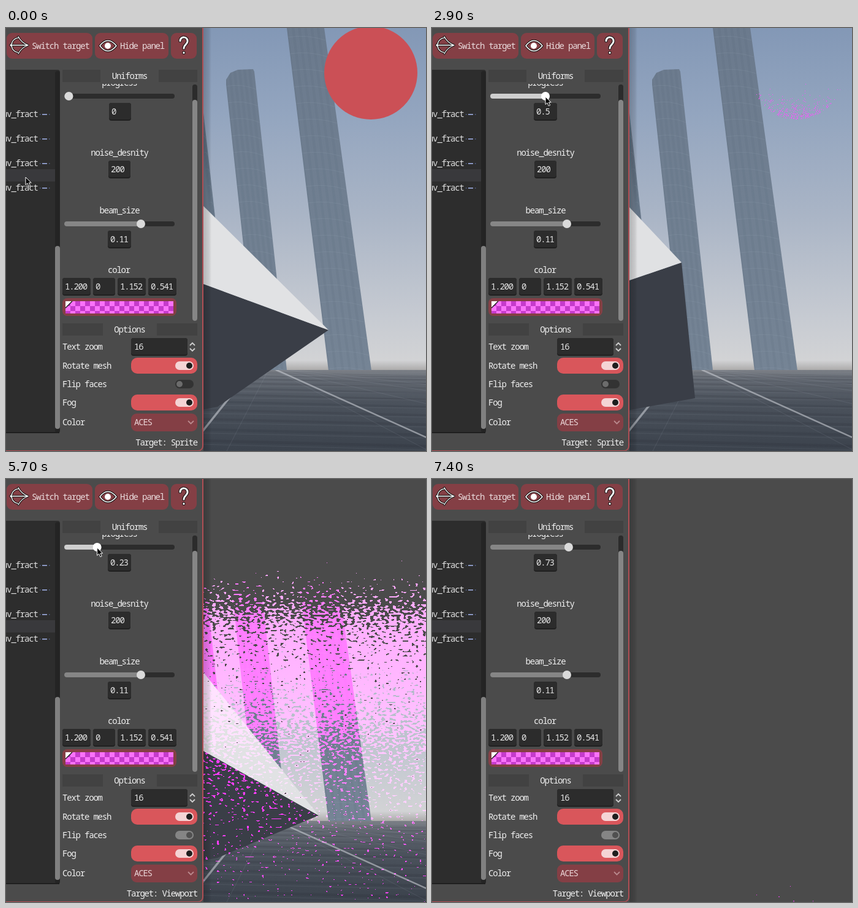
Recreate the animation shown at these times as an HTML page with a canvas. Size 685 px wide and 689 px high, loop 7.8 s.

```html
<!DOCTYPE html>
<html>
<head>
<meta charset="utf-8">
<style>
html, body { margin: 0; width: 100%; height: 100%; overflow: hidden; background: #4b4b4b; }
canvas { display: block; }
</style>
</head>
<body>
<canvas id="stage" width="685" height="689"></canvas>
<script>
const W = 685, H = 689, LOOP = 7800, EDGE = 322, BEAM = 0.11;
const read = { willReadFrequently: true };
const stage = document.getElementById('stage').getContext('2d', read);
const spriteCtx = new OffscreenCanvas(W, 165).getContext('2d', read);
let g = stage;

// --- timing ---
const mix = (a, b, u) => a + (b - a) * u;
const rise = (t, from, to) => Math.max(0, Math.min(1, (t - from) / (to - from)));

function progress(t) {
  const drop = t < 2900 ? 0 : .15 + .42 * rise(t, 3060, 4000);
  return .65 * rise(t, 1200, 2400) - drop
    + .51 * rise(t, 5150, 6550) ** 1.3 + .14 * rise(t, 6760, 7050);
}

// the pointer holds the slider knob, apart from three trips elsewhere
function cursor(t, knobX) {
  let x = knobX, y = 109 + 5 * rise(t, 1200, 2400) - 2 * rise(t, 2800, 2900);
  const trip = (tx, ty, u) => { x = mix(x, tx, u); y = mix(y, ty, u); };
  trip(32, 243, 1 - rise(t, 0, 900));
  trip(70, 27, rise(t, 4000, 4600) - rise(t, 4800, 5150));
  trip(84, -24, rise(t, 7050, 7400));
  return [x, y];
}

// time, top y, tip x, tip y, crease y, lower corner x, y
const MESH = [
  [0, 290, 526, 492, 417, 345, 617],
  [1100, 242, 513, 437, 427, 330, 652],
  [2900, 292, 407, 382, 411, 429, 603],
  [4300, 358, 494, 533, 398, 350, 595],
  [5700, 315, 510, 548, 443, 345, 617]];
function meshAt(t) {
  const i = MESH.findLastIndex(key => key[0] <= t);
  const a = MESH[i], b = MESH[(i + 1) % MESH.length];
  const u = rise(t, a[0], b[0] || LOOP);
  return a.slice(1).map((v, k) => mix(v, b[k + 1], u));
}

// --- drawing helpers ---
function box(x, y, w, h, r, fill) {
  g.fillStyle = fill;
  g.beginPath();
  g.roundRect(x, y, w, h, r);
  g.fill();
}
function dot(x, y, r, fill) {
  g.fillStyle = fill;
  g.beginPath();
  g.arc(x, y, r, 0, 7);
  g.fill();
}
function path(...p) {
  g.beginPath();
  for (let i = 0; i < p.length; i += 2) g.lineTo(p[i], p[i + 1]);
}
function poly(fill, ...p) {
  path(...p);
  g.closePath();
  g.fillStyle = fill;
  g.fill();
}
function line(color, width, ...p) {
  path(...p);
  g.strokeStyle = color;
  g.lineWidth = width;
  g.stroke();
}
function text(s, x, y, align = 'left', color = '#f0f0f0') {
  g.font = '14px "Noto Sans Mono", "DejaVu Sans Mono", monospace';
  g.fontStretch = 'extra-condensed';
  g.letterSpacing = '0px';
  g.letterSpacing = 7.2 - g.measureText('0').width + 'px';
  g.textAlign = align;
  g.fillStyle = color;
  g.fillText(s, x, y);
}
function ramp(x0, y0, x1, y1, ...stops) {
  const r = g.createLinearGradient(x0, y0, x1, y1);
  for (let i = 0; i < stops.length; i += 2) r.addColorStop(stops[i], stops[i + 1]);
  return r;
}

// --- dissolve effect ---
function slope(i, j, x, y) {
  const s = Math.sin(i * 127.1 + j * 311.7) * 43758.5453;
  const a = (s - Math.floor(s)) * 2 * Math.PI;
  return Math.cos(a) * x + Math.sin(a) * y;
}
function noise(x, y) {
  const i = Math.floor(x), j = Math.floor(y), u = x - i, v = y - j;
  const su = u * u * (3 - 2 * u), sv = v * v * (3 - 2 * v);
  const top = mix(slope(i, j, u, v), slope(i + 1, j, u - 1, v), su);
  const low = mix(slope(i, j + 1, u, v - 1), slope(i + 1, j + 1, u - 1, v - 1), su);
  const d = mix(top, low, sv) * .85;
  return .38 + .24 * d + .8 * d ** 3;
}
// part is the visible area, full the whole textured rectangle
function field(part, full) {
  const [x, y, w, h] = part, [fx, fy, fw, fh] = full;
  const values = new Float32Array(w * h);
  for (let i = 0; i < w * h; i++) {
    const u = (x + i % w - fx) / fw, v = (y + Math.floor(i / w) - fy) / fh;
    values[i] = noise(u * 200, v * 200) * v;
  }
  return { part, values };
}
const spriteField = field([510, 0, 175, 165], [504, -25, 190, 178]);
const viewField = field([EDGE, 0, W - EDGE, H], [W - 1225, 0, 1225, H]);

function dissolve(ctx, { part, values }, p) {
  if (p <= 0) return;
  const img = ctx.getImageData(...part), d = img.data;
  values.forEach((n, i) => {
    if (n < p - BEAM) d[i * 4 + 3] = 0;
    else if (n < p) {
      d[i * 4] += 306;
      d[i * 4 + 2] += 294;
    }
  });
  ctx.putImageData(img, part[0], part[1]);
}

// --- scene ---
function column(x0, x1, slope0, slope1, top, shape) {
  g.save();
  path(...shape);
  g.closePath();
  g.clip();
  g.fillStyle = ramp(0, 0, 0, 558, 0, '#6b7a8d', 1, '#758495');
  g.fillRect(EDGE, 0, W, 560);
  for (let k = 0; k < 6; k++) {
    const f = k / 6, x = mix(x0, x1, f);
    line('rgba(60,72,90,.06)', 4, x, 0, x + mix(slope0, slope1, f) * 558, 558);
  }
  for (let y = top; y < 560; y += 27) {
    const l = x0 + slope0 * y, r = x1 + slope1 * y;
    g.beginPath();
    g.moveTo(l, y);
    g.quadraticCurveTo((l + r) / 2, y - 5, r, y + 5);
    g.strokeStyle = 'rgba(170,182,198,.13)';
    g.lineWidth = 1;
    g.stroke();
  }
  g.restore();
}

function floor() {
  g.save();
  g.beginPath();
  g.rect(EDGE, 557, W, H);
  g.clip();
  g.fillStyle = ramp(0, 557, 0, H, 0, '#7c8087', .12, '#616770', .4, '#4b525c', 1, '#3b424c');
  g.fillRect(EDGE, 557, W, H);
  for (let k = 1; k < 14; k++) {
    const y = 560 + k * k * .8;
    line('rgba(20,26,36,.1)', 1 + k * .3, EDGE, y - 3, W, y + 6);
    line('rgba(190,198,210,.09)', 1, EDGE, y + 3, W, y + k);
  }
  for (let x = -300; x < 2000; x += 330) line('rgba(180,188,200,.13)', 1, 430, 553, x, H);
  line('rgba(200,204,210,.6)', 2.5, 440, 556.5, 685, 666.5);
  line('rgba(200,204,210,.6)', 3.5, 398, 560, 318, 660);
  g.restore();
}

function mesh(t) {
  const [top, tipX, tipY, crease, lowX, lowY] = meshAt(t);
  const c = 207 + .14 * (crease - top);
  poly('#3a3e47', EDGE, crease, tipX, tipY, lowX, lowY, EDGE, lowY + (lowX - EDGE) * .18);
  poly(`rgb(${c},${c + 1},${c + 3})`, EDGE, top, tipX, tipY, EDGE, crease);
}

function scene(t) {
  g.fillStyle = ramp(0, 0, 0, 558, 0, '#8398b6', .25, '#93a5bf', .55, '#aab5c6',
    .85, '#c7cbd2', .97, '#d2d3d5', 1, '#aaa9a8');
  g.fillRect(EDGE, 0, W - EDGE, 558);
  column(300, 307, .112, .112, 150, [322, 138, 369, 558, 322, 558]);
  column(349, 398, .107, .109, 95,
    [359, 92, 359, 84, 366, 73, 378, 68, 403, 67, 405, 71, 458, 557, 409, 557]);
  column(458, 519, .122, .138, 15, [458, 0, 519, 0, 596, 558, 526, 558]);
  floor();
  mesh(t);
}

function sprite(p) {
  spriteCtx.clearRect(0, 0, W, 165);
  g = spriteCtx;
  dot(595, 73, 76, '#cb5056');
  dissolve(spriteCtx, spriteField, p);
  g = stage;
  g.drawImage(spriteCtx.canvas, 0, 0);
}

// --- panel ---
function outlined(width, draw) {
  g.lineCap = g.lineJoin = 'round';
  for (const [color, extra] of [['#111', 2], ['#fff', 0]]) {
    g.strokeStyle = color;
    g.lineWidth = width + extra;
    g.beginPath();
    draw();
    g.stroke();
  }
  g.lineCap = 'butt';
  g.lineJoin = 'miter';
}

function buttons(hover) {
  box(1, 8, 140, 42, 9, hover ? '#9c484e' : '#843f45');
  box(145, 8, 120, 42, 9, '#843f45');
  box(269, 8, 42, 42, 9, '#843f45');
  text('Switch target', 42, 34, 'left', '#eadcdd');
  text('Hide panel', 186, 34, 'left', '#eadcdd');
  outlined(1.3, () => {
    g.moveTo(7, 28); g.lineTo(36, 28);
    g.moveTo(10, 25); g.lineTo(7, 28); g.lineTo(10, 31);
    g.moveTo(20, 14); g.quadraticCurveTo(25, 24, 36, 28);
    g.quadraticCurveTo(25, 32, 20, 42);
    g.moveTo(20, 16); g.arc(21, 28, 12, -1.7, 1.7, true);
  });
  outlined(1.6, () => {
    g.moveTo(153, 29); g.quadraticCurveTo(166, 12, 180, 29);
    g.quadraticCurveTo(166, 46, 153, 29);
  });
  dot(166, 29, 5, '#fff');
  outlined(3, () => {
    g.moveTo(284, 21); g.bezierCurveTo(284, 13, 297, 13, 296, 22);
    g.bezierCurveTo(295, 28, 290, 27, 290, 33);
    g.moveTo(290, 40); g.lineTo(290, 40.5);
  });
}

function graph() {
  box(-8, 68, 96, 592, 4, '#2d2d2d');
  g.fillStyle = '#39393c';
  g.fillRect(0, 230, 80, 20);
  box(80, 70, 8, 589, 4, '#242424');
  box(80, 355, 8, 298, 4, '#808080');
  g.fillStyle = '#1f1f1f';
  g.fillRect(0, 658, 87, 2);
  for (let y = 145; y < 270; y += 40) {
    text('uv_fract', -6, y, 'left', '#dedede');
    g.fillStyle = '#a5b6ee';
    g.fillRect(59, y - 5, 8, 1.5);
    g.fillStyle = '#50618e';
    g.fillRect(55, y - 5, 1.5, 1.5);
    g.fillRect(70, y - 5, 1.5, 1.5);
  }
}

function entry(s, x, y, w, pad = 4) {
  box(x, y, w, 29, 4, '#202020');
  box(x, y, w, 27, 4, '#2c2c2c');
  text(s, x + pad, y + 19, 'left', '#e4e4e4');
}
function slider(y, x, hot) {
  box(95, y - 4, 180, 8, 4, '#2c2c2c');
  box(95, y - 4, x - 95, 8, 4, hot ? '#cfcfcf' : '#868686');
  dot(x, y, 7, hot ? '#fff' : '#dadada');
}
function heading(s, y, left, right) {
  g.fillStyle = '#424242';
  g.fillRect(92, y, left - 92, 20);
  g.fillRect(right, y, 312 - right, 20);
  text(s, 201.5, y + 15, 'center');
}
function toggle(y, x, track, knob) {
  box(276, y - 7, 30, 14, 7, track);
  dot(x, y, 5, knob);
}
function swatch() {
  box(92, 440, 186, 29, 8, '#843f45');
  g.fillStyle = '#fa72fa';
  g.fillRect(97, 445, 176, 20);
  g.fillStyle = '#c53bcb';
  for (let j = 0; j < 3; j++)
    for (let i = j % 2; i < 22; i += 2) g.fillRect(97 + i * 8, 445 + j * 8, 8, j < 2 ? 8 : 4);
  poly('#fff', 97, 445, 108, 445, 97, 456);
  line('#111', 1.2, 108, 445, 97, 456);
}

function uniforms(p, knobX, hot) {
  heading('Uniforms', 68, 154, 249);
  g.save();
  g.beginPath();
  g.rect(92, 91, 212, 386);
  g.clip();
  text('progress', 185, 94, 'center');
  slider(111, knobX, hot);
  const label = String(Math.abs(+p.toFixed(2)));
  const w = label.length < 2 ? 36 : 38;
  entry(label, 204 - w, 122, w);
  text('noise_desnity', 185, 208, 'center');
  entry('200', 167, 216, 36);
  text('beam_size', 185, 302, 'center');
  slider(319, 220, false);
  entry('0.11', 166, 330, 38);
  text('color', 184, 399, 'center');
  entry('1.200', 92, 407, 46);
  entry('0', 142, 407, 36);
  entry('1.152', 182, 407, 46);
  entry('0.541', 232, 407, 46);
  swatch();
  g.restore();
  box(304, 92, 8, 385, 4, '#2b2b2b');
  box(304, 117, 8, 360, 4, '#868686');
}

function options(viewport) {
  heading('Options', 481, 158, 246);
  text('Text zoom', 92, 524);
  entry('16', 204, 505, 92, 5);
  line('#d0d0d0', 1.8, 300, 517, 304, 513, 308, 517);
  line('#d0d0d0', 1.8, 300, 522, 304, 526, 308, 522);
  for (const [label, y] of [['Rotate mesh', 550], ['Fog', 610]]) {
    text(label, 92, y + 5);
    box(204, y - 13, 108, 26, 10, '#d9565b');
    toggle(y, 299, '#f4d4d5', '#1e1e1e');
  }
  text('Flip faces', 92, 585);
  if (viewport) toggle(580, 299, '#858585', '#505050');
  else toggle(580, 283, '#333', '#6c6c6c');
  text('Color', 92, 647);
  box(204, 628, 108, 29, 9, '#843f45');
  text('ACES', 209, 647, 'left', '#ead4d6');
  line('#b9898d', 1.8, 297, 640, 301.5, 644.5, 306, 640);
  text('Target: ' + (viewport ? 'Viewport' : 'Sprite'), 312, 680, 'right');
}

function pointer(x, y) {
  g.save();
  g.translate(x, y);
  poly('#000', 0, 0, 0, 12.5, 3, 9.8, 5.2, 14.8, 7.6, 13.8, 5.4, 9, 9.2, 9);
  g.strokeStyle = '#fff';
  g.lineWidth = 1;
  g.stroke();
  g.restore();
}

function draw(t) {
  const viewport = t >= 4700;
  const hot = (t >= 900 && t < 4000) || (t >= 5150 && t < 6500);
  // the knob runs ahead of the value while it is dragged
  const lead = hot && (t < 2400 || t > 3000) ? 130 : 0;
  const p = progress(t), knobX = 102.5 + 165 * progress(t + lead);
  g.clearRect(0, 0, W, H);
  scene(t);
  sprite(viewport ? 0 : p);
  if (viewport) dissolve(stage, viewField, p);
  g.fillStyle = ramp(EDGE, 0, 335, 0, 0, 'rgba(0,0,0,.2)', .7, 'rgba(0,0,0,.1)', 1, 'rgba(0,0,0,0)');
  g.fillRect(EDGE, 0, 13, H);
  box(-20, -20, 342, 709, 8, '#b04e54');
  box(-20, -20, 340, 708, 7, '#4b4b4b');
  buttons(t >= 4400 && t < 5000);
  graph();
  uniforms(p, knobX, hot);
  options(viewport);
  pointer(...cursor(t, knobX));
}

// the picture steps every 100 ms and rests for a moment at these times
const RESTS = [[2600, 2900], [2900, 3100], [6600, 6800], [7400, 7800]];
let start, last = -1;
function frame(now) {
  start ??= now;
  let t = Math.floor((now - start) % LOOP / 100) * 100;
  for (const [from, to] of RESTS) if (t >= from && t < to) t = from;
  if (t !== last) draw(last = t);
  requestAnimationFrame(frame);
}
requestAnimationFrame(frame);
</script>
</body>
</html>
```
